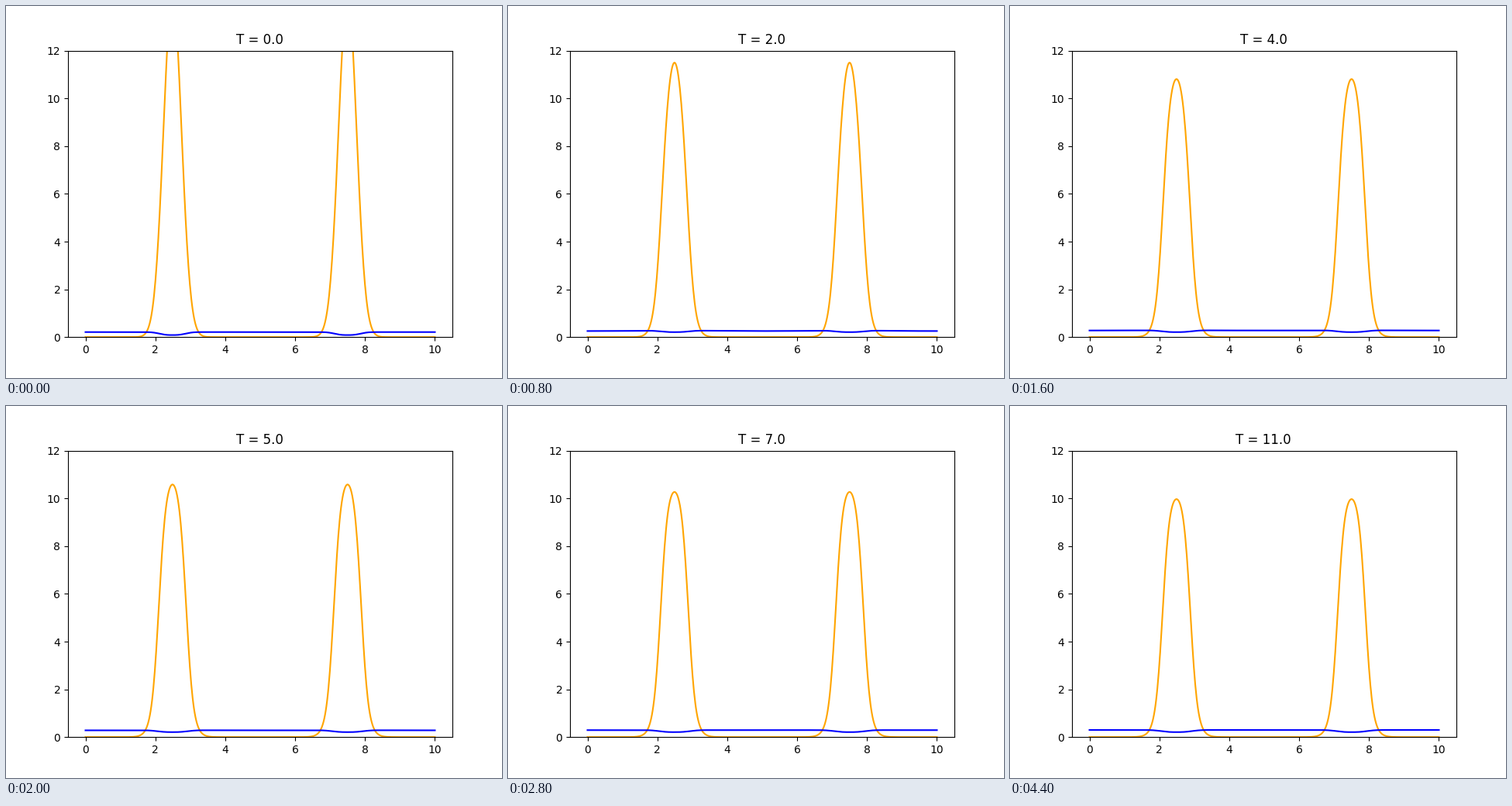
Recreate the animation shown at these times as a matplotlib script. Size 640 by 480 pixels, loop 4600 ms.

```python
import numpy as np
import matplotlib.pyplot as plt
from matplotlib.animation import FuncAnimation

FRAMES = 23
INTERVAL = 200
DT = 0.5
CENTRES = (2.49, 7.5)

x = np.linspace(0, 10, 500)
dist = np.min([np.abs(x - c) for c in CENTRES], axis=0)


def settled(d, core=0.385, soft=0.1, decay=9.0):
    """Log drop of the final bump: rounded top, exponential tails."""
    edge = np.cosh(core / soft)
    return decay * soft * np.log((np.cosh(d / soft) + edge) / (1 + edge))


def peaks(t):
    """Gaussian bumps that sink and relax to the settled shape."""
    height = 9.8 + 2.8 * np.exp(-0.255 * t) + 1.8 * np.exp(-2.3 * t)
    fresh = np.exp(-0.5 * t)
    drop = fresh * dist ** 2 / 0.132 + (1 - fresh) * settled(dist)
    return height * np.exp(-drop)


def level(t):
    """Slowly rising background with a dip under each bump."""
    far = 0.30 - 0.09 * np.exp(-0.33 * t)
    ridge = 0.09 * (np.exp(-0.45 * t) - np.exp(-3 * t))
    outer = far + ridge * np.clip(1 - dist / 2.5, 0, 1) ** 2
    floor = 0.208 - 0.123 * np.exp(-3 * t)
    width = 0.52 - 0.08 * np.exp(-t)
    return floor + (outer - floor) * (1 - np.exp(-(dist / width) ** 2.8))


fig, ax = plt.subplots(figsize=(6.4, 4.8), dpi=100)
bumps, = ax.plot(x, peaks(0), color="orange")
base, = ax.plot(x, level(0), color="blue")
ax.set_xlim(-0.5, 10.5)
ax.set_ylim(0, 12)
title = ax.set_title("T = 0.0", x=0.498)


def draw(i):
    t = i * DT
    bumps.set_ydata(peaks(t))
    base.set_ydata(level(t))
    title.set_text(f"T = {t:.1f}")
    return bumps, base, title


anim = FuncAnimation(fig, draw, frames=FRAMES, interval=INTERVAL,
                     repeat=True, repeat_delay=0, blit=False)
plt.show()
```
